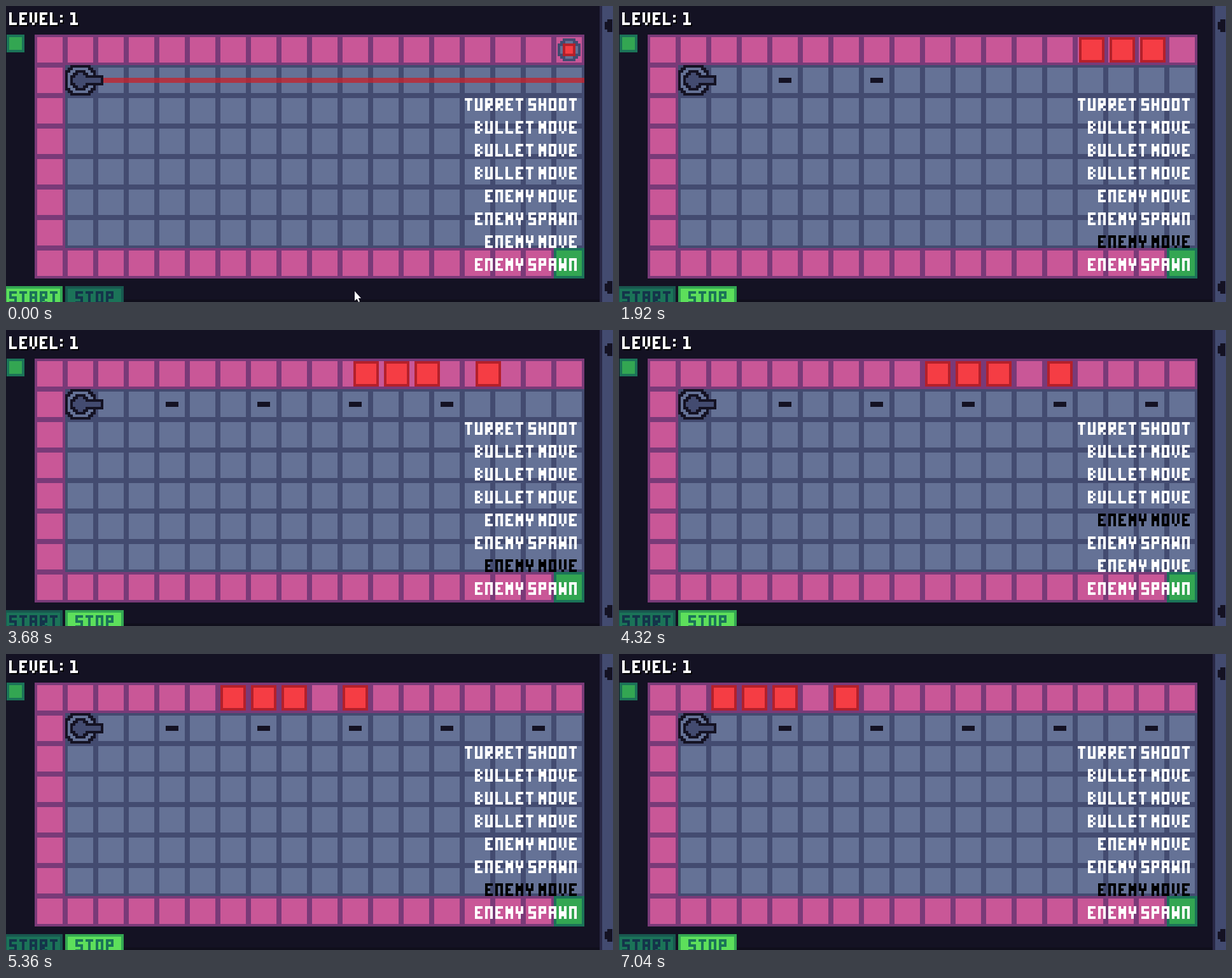
Write an HTML page with a canvas that moves like this. It is 954 px wide and 466 px high and loops after 7080 ms.

```html
<!DOCTYPE html>
<html lang="en">
<head>
<meta charset="utf-8">
<title>Turret queue</title>
<style>
html, body { margin: 0; width: 100%; height: 100%; overflow: hidden; background: #141223; }
canvas { display: block; }
</style>
</head>
<body>
<canvas id="stage" width="954" height="466"></canvas>
<script>
const g = document.getElementById('stage').getContext('2d');
const LOOP = 7080, PRESS = 40, BEGIN = 108, U = 4, TILE = 48;
const INK = '#141223', SLATE = '#434b70', STEEL = '#657296', PINK = '#c95797', PURPLE = '#793a78',
      RED = '#f53d44', BLOOD = '#b4202a', GREEN = '#33a652', PINE = '#1b7358', LIME = '#5ddf5b';

// 3x5 pixel font: one octal digit per row
const FONT = {
  A: '75755', B: '65656', E: '74647', H: '55755', L: '44447', M: '57755', N: '75555', O: '75557', P: '75744',
  R: '75765', S: '74717', T: '72222', U: '55557', V: '55552', W: '55775', Y: '55722', ':': '04040', 1: '62227'
};
const advance = ch => ch === ' ' ? 4 : ch === ':' ? 12 : 16;
const textWidth = s => [...s].reduce((w, ch) => w + advance(ch), -U);

const QUEUE = ['TURRET SHOOT', 'BULLET MOVE', 'BULLET MOVE', 'BULLET MOVE',
               'ENEMY MOVE', 'ENEMY SPAWN', 'ENEMY MOVE', 'ENEMY SPAWN'];
const TIME = { 'TURRET SHOOT': 200, 'BULLET MOVE': 61.3, 'ENEMY MOVE': 215, 'ENEMY SPAWN': 169 };
const RECOIL = 112, WALK = 112, GROW = 110, WAVE = '11101';

// Play the queue through once; each actor keeps its birth and move times
const steps = [], enemies = [], bullets = [];
let clock = BEGIN, wave = 0;
for (let cycle = 0; cycle < 8; cycle++) {
  QUEUE.forEach((action, row) => {
    if (action === 'ENEMY SPAWN') {
      if (WAVE[wave++] !== '1') return;
      enemies.push({ born: clock, moves: [] });
    } else if (action === 'ENEMY MOVE') {
      if (!enemies.length) return;
      enemies.forEach(e => e.moves.push(clock));
    } else if (action === 'BULLET MOVE') {
      bullets.forEach(b => b.moves.push(clock));
    } else {
      bullets.push({ born: clock, moves: [] });
    }
    steps.push({ at: clock, row, action });
    clock += TIME[action];
  });
}

const clamp = v => Math.max(0, Math.min(1, v));
const travel = (actor, t, span) => actor.moves.reduce((sum, m) => sum + clamp((t - m) / span), 0);
const center = col => 69 + TILE * col;

function rect(x, y, w, h, color) {
  g.fillStyle = color;
  g.fillRect(x, y, w, h);
}

function box(x, y, w, h, edge, fill) {
  rect(x, y, w, h, edge);
  rect(x + U, y + U, w - 2 * U, h - 2 * U, fill);
}

// Stepped round shape, n units across
function disc(x, y, n, color) {
  const s = n * U;
  rect(x + 2 * U, y, s - 4 * U, s, color);
  rect(x + U, y + U, s - 2 * U, s - 2 * U, color);
  rect(x, y + 2 * U, s, s - 4 * U, color);
}

function ring(x, y, n, edge, fill) {
  disc(x, y, n, edge);
  disc(x + U, y + U, n - 2, fill);
}

function text(s, x, y, color) {
  for (const ch of s) {
    [...(FONT[ch] || '')].forEach((bits, r) => {
      for (let c = 0; c < 3; c++) if (bits & (4 >> c)) rect(x + c * U, y + r * U, U, U, color);
    });
    x += advance(ch);
  }
}

function drawBoard() {
  rect(45, 45, 18 * TILE, 8 * TILE, SLATE);
  for (let r = 0; r < 8; r++) {
    for (let c = 0; c < 18; c++) {
      const path = r === 0 || r === 7 || c === 0, goal = r === 7 && c === 17;
      box(45 + c * TILE, 45 + r * TILE, TILE, TILE,
        goal ? PINE : path ? PURPLE : SLATE, goal ? GREEN : path ? PINK : STEEL);
    }
  }
}

function drawTurret(recoil) {
  ring(93, 93, 12, INK, STEEL);
  ring(101, 101, 8, INK, SLATE);
  const tip = 153 - recoil;
  rect(129, 109, tip - 129, 16, INK);
  rect(125, 113, tip - 129, 8, SLATE);
}

function drawButton(label, x, active) {
  box(x, 441, 92, 36, active ? GREEN : '#18584f', active ? LIME : PINE);
  text(label, x + (92 - textWidth(label)) / 2, 449, active ? PINE : '#14344a');
}

function drawPanel() {
  rect(933, 0, 4, 466, '#2a2947');
  rect(937, 0, 17, 466, SLATE);
  for (const y of [21, 433]) {
    rect(945, y, 8, 20, INK);
    rect(941, y + 4, 12, 12, INK);
  }
}

function drawCursor() {
  g.beginPath();
  [[548, 449], [548, 464], [551.5, 461], [554, 466], [556, 465], [553.8, 460], [558, 460]]
    .forEach(p => g.lineTo(...p));
  g.closePath();
  g.fillStyle = '#fff';
  g.fill();
}

function draw(t) {
  const ready = t < PRESS;
  const step = steps.filter(s => s.at <= t).pop() || { at: LOOP, row: 0 };

  rect(0, 0, 954, 466, INK);
  rect(185, 462, 748, 4, '#100f1c');
  text('LEVEL: 1', 7, 12, '#000');
  text('LEVEL: 1', 5, 10, '#fff');
  box(1, 45, 28, 28, PINE, GREEN);
  drawBoard();

  if (ready) {
    ring(867, 51, 9, SLATE, STEEL);
    box(875, 59, 20, 20, BLOOD, RED);
    rect(153, 113, 756, 8, 'rgba(196,36,46,.78)');
  }
  for (const b of bullets) {
    const col = 1 + travel(b, t, TIME['BULLET MOVE']);
    if (t >= b.born && col < 18) rect(Math.round(center(col)) - 10, 113, 20, 8, INK);
  }
  const kick = step.action === 'TURRET SHOOT' && t - step.at < RECOIL;
  drawTurret(kick ? 8 : 0);

  for (const e of enemies) {
    if (t < e.born) continue;
    const size = Math.round(20 * clamp((t - e.born) / GROW)) * 2;
    const x = Math.round(center(17 - travel(e, t, WALK)));
    if (size > 8) box(x - size / 2, 69 - size / 2, size, size, BLOOD, RED);
  }

  QUEUE.forEach((s, i) =>
    text(s, 897 - textWidth(s), 145 + 36 * i, !ready && i === step.row ? '#000' : '#fff'));
  drawButton('START', -3, ready);
  drawButton('STOP', 93, !ready);
  drawPanel();
  if (ready) drawCursor();
}

const start = performance.now();
function tick() {
  draw((performance.now() - start) % LOOP);
  requestAnimationFrame(tick);
}
tick();
</script>
</body>
</html>
```
